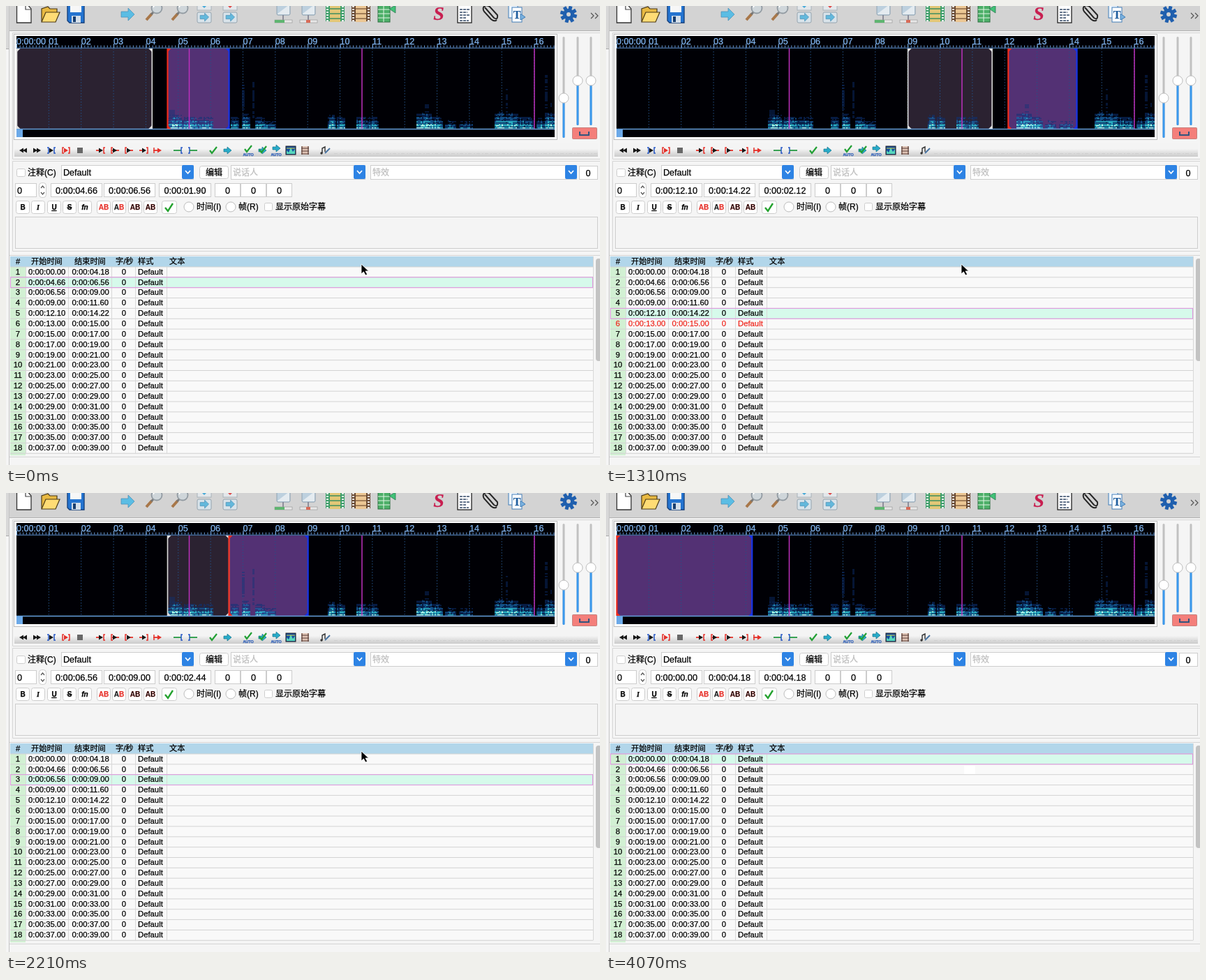
An HTML page that plays this animation: 851 by 658 pixels, repeating every 5.15 s.

```html
<!DOCTYPE html>
<html lang="zh">
<head>
<meta charset="utf-8">
<title>Subtitle timing</title>
<style>
html, body { margin: 0; width: 100%; height: 100%; overflow: hidden; background: #f5f5f5; }
svg { display: block; width: 851px; height: 658px; font-family: "Liberation Sans", "Noto Sans CJK SC", "Noto Sans CJK", sans-serif; }
text { white-space: pre; }
</style>
</head>
<body>
<svg id="stage" viewBox="0 0 851 658" xmlns="http://www.w3.org/2000/svg"></svg>
<script>
const LOOP = 5150;
const STEPS = [[0, 2], [300, 3], [780, 4], [1310, 5], [1760, 4], [2210, 3], [2750, 2], [3920, 1]];
const LINES = [[0, 4.18], [4.66, 6.56], [6.56, 9], [9, 11.6], [12.1, 14.22]];
for (let s = 13; s <= 37; s += 2) LINES.push([s, s + 2]);

const X0 = 15, SECOND = 46.35, ROW = 14.85, TOP = 374;
const timeX = s => X0 + s * SECOND;
const rowY = n => TOP + (n - 1) * ROW;
const stamp = s => "0:00:" + s.toFixed(2).padStart(5, "0");

// Markup helpers
const rect = (x, y, w, h, fill, more = "") =>
  `<rect x="${x}" y="${y}" width="${w}" height="${h}" fill="${fill}" ${more}/>`;
const path = (d, fill, stroke = "none", w = 1, more = "") =>
  `<path d="${d}" fill="${fill}" stroke="${stroke}" stroke-width="${w}" ${more}/>`;
const line = (d, stroke, w = 1, more = "") => path(d, "none", stroke, w, more);
const disc = (x, y, r, fill, stroke = "none", w = 1) =>
  `<circle cx="${x}" cy="${y}" r="${r}" fill="${fill}" stroke="${stroke}" stroke-width="${w}"/>`;
const text = (x, y, s, size, fill = "#000", more = "") =>
  `<text x="${x}" y="${y}" font-size="${size}" fill="${fill}" ${more} stroke="${fill}" stroke-width=".25">${s}</text>`;
const at = (x, y, ...parts) => `<g transform="translate(${x} ${y})">${parts.join("")}</g>`;
const mid = 'text-anchor="middle"';
const box = (x, y, w, h, fill = "#fff", r = 0, edge = "#cdcdcd") =>
  rect(x + .5, y + .5, w - 1, h - 1, fill, `rx="${r}" stroke="${edge}"`);

function windowFrame() {
  return rect(0, 0, 851, 658, "#f5f5f5") + rect(0, 0, 851, 35, "#d3d3d3") +
    line("M4 35.5H851", "#b2b2b2") + rect(0, 0, 4, 61, "#d8d8d8") +
    line("M0 61.5H4", "#aaa") + line("M4.5 0V658", "#c4c4c4") +
    line("M851 38.5H9.5V219.5H851M851 222.5H9.5V351.5H851M5 357.5H851M5 646.5H851", "#d4d4d4");
}

function mainToolbar() {
  const arrow = (c, k = 1) => path(`M${-9 * k} ${-4 * k}H${k}V${-9 * k}L${10 * k} 0L${k} ${9 * k}V${4 * k}H${-9 * k}Z`, c, "#4f93b8", .8);
  const lens = x => at(x, 0, line("M-2 11L-10 20", "#a87749", 4), line("M0 9L-3 12", "#777", 3),
    disc(5, 3, 7.5, "#cfd6da", "#929ba2", 1.8), line("M0 2A6 6 0 0 1 5 -2", "#fff", 1.5));
  const cards = (x, c) => at(x, 0, rect(-10, -2, 20, 8, "#e3e7ea", 'stroke="#a9b3ba"'),
    rect(-10, 9, 20, 15, "#d8e3ea", 'rx="2" stroke="#94a3ae"'), at(0, 16, arrow("#62b8dc", .65)), path("M-5 -2H5L0 3Z", c));
  const fader = (x, down) => at(x, 0, rect(-9, -3, 19, 16, "#bdd0de", 'rx="2" stroke="#8ea2b2"'),
    path("M-8 11L9 -2V12H-8Z", "#e4ebf0"), line("M0 13V20", "#778", 1.5),
    rect(-12, 20, 25, 4, "#e7e7e7", 'stroke="#9a9a9a" stroke-width=".7"'),
    rect(down ? -3 : -12, 20, down ? 6 : 14, 4, down ? "#d86b58" : "#5eb570"));
  const film = (x, side, centre, rule) => {
    let holes = "";
    for (let i = 0; i < 6; i++) holes += rect(-12, i * 4, 3, 2, "#eee") + rect(10, i * 4, 3, 2, "#eee");
    return at(x, 0, rect(-13, -2, 27, 24, side), holes, rect(-7, -2, 15, 25, centre), line("M-7 4H8M-7 11H8M-7 18H8", rule, 1.5));
  };
  let teeth = "";
  for (let a = 0; a < 360; a += 45) teeth += rect(-2.5, -12, 5, 8, "#1f5fae", `transform="rotate(${a + 15})"`);

  return path("M15.5 -4H29L36 4V24H15.5Z", "#fff", "#333", 1.3) + line("M28 -2V5H36", "#444", 1.2) +
    path("M51 22V4L60 1L63 4H73V10", "#e8b942", "#4c3b16", 1.2) + path("M51 23L57 9H77L71 23Z", "#ffdc75", "#4c3b16", 1.2) +
    path("M88 -2H112V24H91L88 21Z", "#2474d0", "#123d79", 1.3) + rect(92, -2, 16, 11, "#f7f7f7") +
    rect(94, 14, 13, 10, "#d4dfe9") + rect(96, 15, 4, 8, "#183f70") +
    at(174, 12, arrow("#5bbde4")) + lens(211) + lens(248) + cards(284, "#4aabd8") + cards(321, "#dd4c4c") +
    fader(397, false) + fader(433, true) + film(471, "#3f9f6b", "#e2c777", "#3f8f60") + film(508, "#6b4c35", "#ebc693", "#8a6544") +
    at(545, 0, rect(-12, -2, 17, 25, "#4caf68", 'stroke="#2f6f42"'), line("M-12 5H5M-12 11H5M-12 17H5M-4 -2V23", "#e2f5e5"),
      path("M4 4L13 -1V10Z", "#41c177", "#21704a", .7)) +
    text(620, 20, "S", 28, "#c81e50", `${mid} font-family="Liberation Serif, serif" font-style="italic" font-weight="bold"`) +
    rect(647, -3, 20, 27, "#fff", 'stroke="#222" stroke-width="1.3"') +
    line("M650 5H664M650 9H661M650 13H664M650 17H659M650 21H663", "#344a67", 1.4, 'stroke-dasharray="4 1"') +
    line("M686 2L699 17Q705 21 704 13L693 1Q687 -3 684 2Q683 5 685 8L695 19Q700 23 703 20", "#262626", 2) +
    rect(720, -3, 13, 20, "#edf5fd", 'stroke="#427eb8"') + rect(725, 2, 14, 21, "#fff", 'stroke="#427eb8"') +
    text(732, 18, "T", 16, "#2562a0", `${mid} font-family="Liberation Serif, serif" font-weight="bold"`) +
    path("M737 11L744 16L737 20Z", "#7ab2df", "#427eb8") +
    at(806, 12, teeth, disc(0, 0, 8, "#1f5fae"), disc(0, 0, 3, "#d3d3d3")) +
    line("M838 10L842 14L838 18M844 10L848 14L844 18", "#555", 1.2);
}

function spectrogram() {
  let seed = 41;
  const random = () => (seed = (seed * 16807) % 2147483647) / 2147483647;
  const shades = ["#0d3479", "#1763a4", "#2bb5cc", "#b5fff0"];
  const paths = ["", "", "", ""];
  // left, right, height, strength
  const bursts = [[232, 253, 20, .9], [253, 275, 17, .85], [275, 297, 17, .65], [322, 334, 18, .7], [338, 350, 21, .8],
    [357, 371, 18, .65], [369, 386, 12, .6], [461, 473, 20, .8], [474, 486, 18, .75], [502, 516, 19, .8],
    [516, 534, 17, .65], [588, 610, 23, 1], [608, 625, 18, .8], [629, 645, 13, .5], [649, 669, 12, .42],
    [700, 714, 24, 1], [714, 734, 23, .9], [734, 756, 18, .75], [760, 771, 15, .7], [772, 786, 24, .85]];
  const plot = (x, y, w, level) => paths[level] += `M${x} ${y.toFixed(1)}h${w}v1.5h-${w}z`;
  for (const [a, b, high, force] of bursts)
    for (let x = a; x < b; x += 2) {
      const env = force * (.55 + .45 * Math.sin(Math.PI * (x - a + 1) / (b - a))) * (.75 + .5 * random());
      for (let h = 1; h < high; h += 1.5) {
        const band = .75 + .35 * Math.cos(h * 1.25);
        const v = 1.7 * env * band * Math.exp(-h / (high * .45)) * (.6 + .7 * random());
        if (v > .1) plot(x, 175 - h, 2, v > .85 ? 3 : v > .45 ? 2 : v > .22 ? 1 : 0);
      }
    }
  // Faint tall overtones
  for (const [x, w, high] of [[338, 4, 65], [353, 3, 68], [716, 3, 64], [772, 4, 78], [780, 2, 40], [600, 6, 36], [234, 8, 30]])
    for (let h = 15; h < high; h += 2) if (random() > .3) plot(x, 176 - h, w, 0);
  return paths.map((d, i) => path(d, shades[i], "none", 0, `opacity="${[.55, .8, .95, 1][i]}"`)).join("");
}

function audioPanel() {
  let ruler = text(15, 55, "0:00:00", 12.6, "#84b9f4"), grid = "";
  for (let s = 1; s <= 16; s++) {
    ruler += text(timeX(s), 55, String(s).padStart(2, "0"), 12.6, "#84b9f4");
    grid += `M${timeX(s).toFixed(2)} 61V176`;
  }
  const slider = (x, knob, end) => rect(x - 1.5, 44, 3, end - 44, "#c1c1c1", 'rx="1.5"') +
    rect(x - 1.5, knob, 3, end - knob, "#3b99ee", 'rx="1.5"') + disc(x, knob, 7, "#fff", "#bdbdbd");
  return box(11, 40, 779, 152, "#fff", 0, "#bcbcbc") + rect(15, 43, 771, 145, "#000005") + ruler +
    line("M15 58H786", "#6b9cd8", 3, 'stroke-dasharray="1 3.635"') + line("M15 57H786", "#84b9f4", 6, 'stroke-dasharray="1 45.35"') +
    line("M15 60.2H786", "#6199d8") + '<g id="fills"></g>' + line(grid, "#245187", 1, 'stroke-dasharray="1.5 2.5"') +
    spectrogram() + line("M262.5 61V176M510 61V176M757 61V176", "#bd30bd", 1.5) +
    line("M15 176.5H786", "#659fdb", 1.3) + rect(15, 177, 9, 11, "#6ca9e8") + '<g id="edges"></g>' +
    slider(799, 132, 189) + slider(819, 107, 171) + slider(838, 107, 171) +
    box(811, 174, 36, 17, "#f47f7b", 1, "#c7807d") + line("M822 180V185H835V180", "#31557f", 2);
}

function audioToolbar() {
  const tri = (x, c, dir = 1) => path(`M${x - 3 * dir} -3.5L${x + 3 * dir} 0L${x - 3 * dir} 3.5Z`, c);
  const bracket = (x, c, dir = 1) => line(`M${x + 2 * dir} -4H${x}V4H${x + 2 * dir}`, c, 1.5);
  const bar = (a, b, c) => line(`M${a} 0H${b}`, c, 1.8);
  const check = (c = "#22a034") => line("M-5 0L-2 4L5 -5", c, 2.2);
  const go = path("M-5 -2H0V-5L6 0L0 5V2H-5Z", "#28abc9", "#16738c", .7);
  const auto = text(0, 7.5, "AUTO", 5.4, "#2659b8", mid + ' font-weight="bold"');
  const red = "#e52f28", blue = "#2455c4", ink = "#171717", green = "#259943";
  const icons = [
    [24, tri(-2, ink, -1), tri(3, ink, -1)], [44, tri(-2, ink), tri(3, ink)],
    [65, bracket(-4, blue, -1), tri(0, ink), bracket(4, blue)], [86, bracket(-5, red), tri(0, red), bracket(5, red, -1)],
    [106, rect(-4, -4, 8, 8, "#686868")], [136, bar(-7, -2, red), tri(0, ink), bracket(4, red)],
    [156, bracket(-5, red), bar(-4, 6, red), tri(0, ink)], [176, bracket(-5, red), tri(0, ink), bar(2, 6, red)],
    [197, bar(-6, 0, red), tri(1, ink), bracket(6, red, -1)], [217, bar(-6, 2, red), tri(3, red), line("M-5 -4V4", red, 1.5)],
    [247, bar(-7, 4, green), bracket(4, blue)], [267, bracket(-4, blue, -1), bar(-4, 7, green)],
    [297, check()], [317, go], [347, at(0, -2, check()), auto], [367, go, at(1, -1, check())], [387, at(0, -3, go), auto],
    [408, rect(-7, -6, 14, 12, "#174b9f", 'stroke="#222"'), path("M-6 5V0L-3 3L0 -4L3 2L6 -2V5Z", "#56d7bd"), line("M-6 -3H6", "#d6df42")],
    [428, rect(-5, -6, 11, 12, "#dfc3b4"), line("M-4 -6V6M5 -6V6M-5 -3H6M-5 1H6M-5 5H6", "#583e38", 1.2)],
    [458, line("M-5 4V-3L-1 -5V2", "#333", 1.4), disc(-6, 4, 1.7, "#333"), line("M-1 4L6 -3", "#4773a2", 2)]
  ];
  return `<defs><linearGradient id="shade" x2="0" y2="1"><stop offset=".4" stop-color="#f4f4f4"/><stop offset="1" stop-color="#cbcbcb"/></linearGradient></defs>` +
    rect(12, 197, 836, 19, "url(#shade)") + line("M470 211.5H848", "#d0d0d0", 1, 'stroke-dasharray="5 3 2 2"') +
    icons.map(([x, ...parts]) => at(x, 207, ...parts)).join("");
}

function editPanel() {
  const combo = (x, w, label, fill) => box(x, 228, w, 21) + text(x + 3, 243, label, label[0] === "D" ? 12.6 : 12, fill) +
    rect(x + w - 17, 228, 17, 20, "#2d83e4", 'rx="2"') + line(`M${x + w - 12} 236L${x + w - 8.5} 240L${x + w - 5} 236`, "#fff", 1.7);
  const field = (x, w, id, value = "0") => box(x, 254, w, 20) + text(x + w / 2, 269, value, 12.7, "#000", `${mid} id="${id}"`);
  const button = (x, s, more = "") => box(x - 10, 279, 20, 19, "#fff", 3) +
    text(x, 292, s, 10, "#000", `${mid} font-weight="bold" ${more}`);
  const red = "#e73730", outline = 'stroke="#d62a22"';
  const pair = (a, b) => [a, b].map((c, i) => `<tspan fill="${c}" stroke="${c}">${"AB"[i]}</tspan>`).join("");
  return box(15, 233, 13, 12, "#fff", 2) + text(31, 243, "注释(C)", 12) +
    combo(79, 190, "Default", "#000") + box(277, 229, 42, 19, "#fff", 3) + text(298, 243, "编辑", 12, "#000", mid) +
    combo(322, 193, "说话人", "#bdbdbd") + combo(522, 296, "特效", "#bdbdbd") + box(821, 229, 27, 20) + text(834, 244, "0", 12.7, "#000", mid) +
    box(13, 254, 31, 20) + text(16, 269, "0", 12.7) + box(47, 253, 11, 22, "#fff", 4) +
    line("M50 261L52.5 258L55 261M50 267L52.5 270L55 267", "#555", 1.2) +
    field(64, 74, "start") + field(140, 74, "end") + field(219, 75, "span") +
    field(299, 37, "m1") + field(336, 37, "m2") + field(373, 37, "m3") +
    button(24, "B") + button(46, "I", 'font-style="italic" font-family="Liberation Serif, serif"') +
    button(69, "U", 'text-decoration="underline"') + button(91, "S", 'text-decoration="line-through"') +
    button(113, "fn", 'font-style="italic"') + button(140, pair(red, red)) + button(162, pair("#222", red)) +
    button(185, "AB", outline) + button(207, "AB", outline) +
    box(223, 279, 22, 19, "#fff", 3) + line("M228 289L232 294L239 283", "#25a22f", 2.4) +
    disc(262, 288, 7, "#fff", "#bcbcbc") + text(273, 292, "时间(I)", 12) + disc(322, 288, 7, "#fff", "#bcbcbc") + text(333, 292, "帧(R)", 12) +
    box(370, 282, 12, 12, "#fff", 2) + text(386, 292, "显示原始字幕", 12) + box(13, 302, 835, 46, "#f4f4f4");
}

function table() {
  const bottom = rowY(19), head = [[17, "#", mid], [36, "开始时间"], [98, "结束时间"], [157, "字/秒"], [189, "样式"], [234, "文本"]];
  let s = rect(6, 359, 836, 282, "#f9f9f9") + rect(6, TOP, 22, bottom - TOP + 3, "#d2f0d3") + rect(6, 359, 835, 15, "#b2d6ea") +
    head.map(([x, label, more]) => text(x, 370, label, 11.2, "#000", more)).join("") + '<g id="rowFill"></g>';
  for (let n = 1; n <= 19; n++) s += line(`M6 ${rowY(n)}H841`, "#d3d3d3");
  s += line(`M28.5 ${TOP}V${bottom}M89.5 ${TOP}V${bottom}M151.5 ${TOP}V${bottom}M185.5 ${TOP}V${bottom}M230.5 ${TOP}V${bottom}M841.5 359V${bottom}`, "#d8d8d8") +
    '<g id="rowEdge"></g>';
  LINES.forEach(([a, b], i) => {
    const cell = (x, label, more) => text(x, rowY(i + 1) + 10.7, label, 11.3, "currentColor", more);
    s += `<g class="row">` + cell(17, i + 1, mid) + cell(32, stamp(a)) + cell(94.5, stamp(b)) +
      cell(169, "0", mid) + cell(189, "Default") + "</g>";
  });
  return s + rect(845, 362, 8, 147, "#c3c3c3", 'rx="4"');
}

const stage = document.getElementById("stage");
stage.innerHTML = windowFrame() + mainToolbar() + audioPanel() + audioToolbar() + editPanel() + table() +
  rect(513, 391, 16, 12, "#fff", 'id="patch"') +
  path("M0 0V14L3.4 11L6 16L8.6 14.7L6 10H10.5Z", "#000", "#fff", .8, 'id="cursor"');
const $ = id => document.getElementById(id);
const rows = [...document.querySelectorAll(".row")];

function span([a, b], startColor, endColor, w) {
  const l = timeX(a) + .5, r = timeX(b) + .5;
  return line(`M${l} 61V176`, startColor, w) + line(`M${r} 61V176`, endColor, w) +
    path(`M${l} 61h5l-5 5zM${l} 176h5l-5 -5z`, startColor) + path(`M${r} 61h-5l5 5zM${r} 176h-5l5 -5z`, endColor);
}

function select(n) {
  const now = LINES[n - 1], before = LINES[n - 2];
  const fill = ([a, b], c) => rect(timeX(a), 61, (b - a) * SECOND, 115, c);
  $("fills").innerHTML = (before ? fill(before, "#2b2231") : "") + fill(now, "#533174");
  $("edges").innerHTML = (before ? span(before, "#ddd", "#ddd", 1.6) : "") + span(now, "#f02c1c", "#1734e8", 2.2);
  $("start").textContent = stamp(now[0]);
  $("end").textContent = stamp(now[1]);
  $("span").textContent = stamp(now[1] - now[0]);
  $("rowFill").innerHTML = rect(28, rowY(n), 813, ROW, "#d6faeb");
  $("rowEdge").innerHTML = rect(6.5, rowY(n), 834, ROW, "none", 'stroke="#df94df"');
  rows.forEach((row, i) => {
    const [a, b] = LINES[i];
    row.style.color = i !== n - 1 && a < now[1] && b > now[0] ? "#f0271d" : "#000";
  });
}

let current = 0;
const origin = performance.now();
function draw() {
  const t = (performance.now() - origin) % LOOP;
  const row = STEPS.filter(([ms]) => ms <= t).pop()[1];
  if (row !== current) select(current = row);
  const moved = t >= 3920;
  $("patch").setAttribute("visibility", moved ? "visible" : "hidden");
  $("cursor").setAttribute("visibility", t < 4070 ? "visible" : "hidden");
  $("cursor").setAttribute("transform", moved ? "translate(515 384)" : "translate(509 370)");
  requestAnimationFrame(draw);
}
draw();
</script>
</body>
</html>
```
